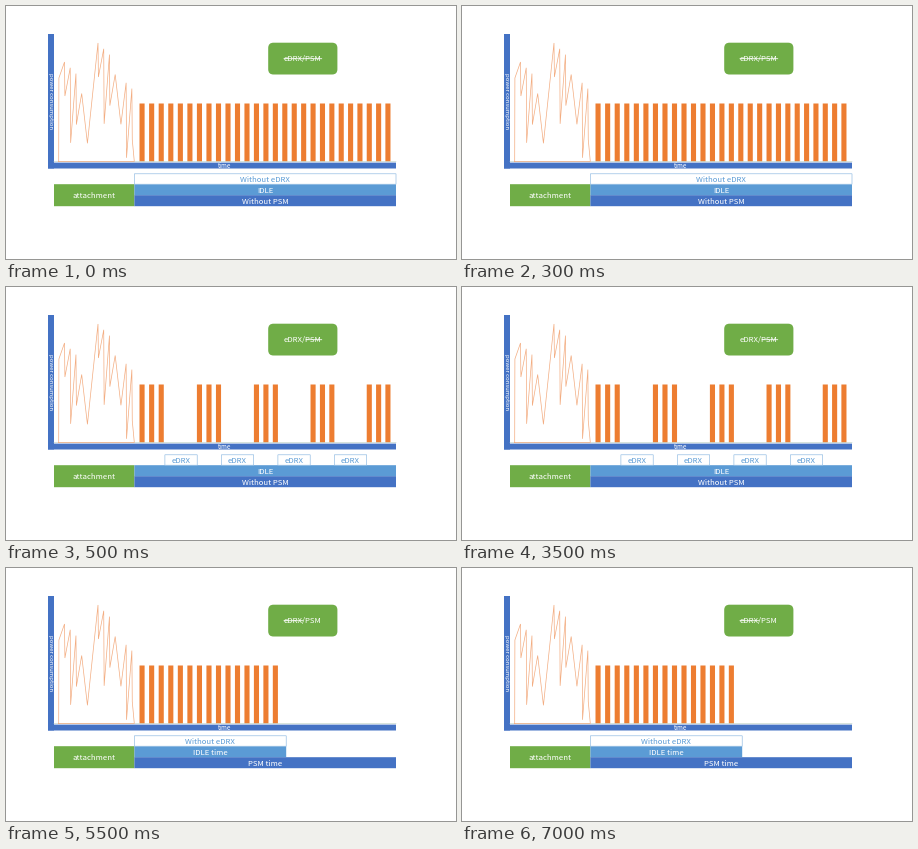
These frames come from a looping animation (450x253 px, 8 s). A matplotlib script:

```python
import matplotlib.pyplot as plt
from matplotlib.animation import FuncAnimation
from matplotlib.patches import FancyBboxPatch, Rectangle

W, H, DPI = 450, 253, 64
STEP = 500
FRAMES = 16

BLUE, SKY, GREEN, ORANGE = "#4472c4", "#5b9bd5", "#70ad47", "#ed7d31"
GROUND = 155.5
LEFT, SPLIT, RIGHT = 48, 128.4, 390
PITCH = 5.73
FALLS = (34, 75, 51)

plt.rcParams["font.family"] = "Noto Sans CJK JP"
fig = plt.figure(figsize=(W / DPI, H / DPI), dpi=DPI, facecolor="white")
ax = fig.add_axes([0, 0, 1, 1])


def pt(px):
    return px * 72 / DPI


def box(x0, y0, x1, y1, fill, edge="none", lw=0.7):
    ax.add_patch(Rectangle((x0, y0), x1 - x0, y1 - y0, facecolor=fill,
                           edgecolor=edge, linewidth=pt(lw), snap=False))


def line(xs, ys, color, lw):
    ax.plot(xs, ys, color=color, lw=pt(lw), solid_joinstyle="miter", snap=False)


def label(x, y, text, color="white", size=7.8, **kw):
    kw = {"ha": "center", "va": "baseline", **kw}
    ax.text(x, y, text, color=color, fontsize=pt(size), **kw)


def teeth(x, top, first=0):
    """Sawtooth whose peaks sink step by step."""
    pts = []
    for k in range(first, 3):
        px, py = x + PITCH * k, top + 5.8 * k
        pts += [(px, py), (px + 0.4, py + FALLS[k])]
    return pts


def burst(x, top):
    """Three teeth, then one slow peak and its trough."""
    return teeth(x, top) + [(x + 3 * PITCH, top + 31.5),
                            (x + 4 * PITCH, top + 81.3)]


def attach_curve():
    path = [(52.7, GROUND), (52.9, 72)]
    path += burst(58.5, 56) + burst(92, 37) + teeth(114.4, 71, first=1)
    path += [(128.3, GROUND), path[0]]
    line(*zip(*path), "#f3ac80", 0.7)


def chart(shown):
    line([LEFT, RIGHT], [GROUND, GROUND], "#bdd2c6", 0.6)
    attach_curve()
    for i in range(27):
        if shown(i):
            x = 133.5 + 9.6 * i - 0.0055 * i * i
            box(x, 97.5, x + 5.1, GROUND, ORANGE)
    box(42, 28, LEFT, 162.5, BLUE)
    box(42, 156.6, RIGHT, 162.5, BLUE)
    label(44.5, 95, "power consumption", size=6, rotation=-90, va="center")
    label(219, 161.7, "time", size=6.2)


def badge(struck):
    ax.add_patch(FancyBboxPatch((262.2, 36.7), 69.2, 31.8, facecolor=GREEN,
                                edgecolor="none",
                                boxstyle="round,pad=0,rounding_size=5.3"))
    label(296.9, 55.3, "eDRX/PSM")
    line(struck, [52.7, 52.7], "white", 0.8)


def phases(idle_end, idle, psm):
    box(LEFT, 178.2, SPLIT, 200.2, GREEN)
    box(SPLIT, 178.2, idle_end, 189.2, SKY)
    box(SPLIT, 189.2, RIGHT, 200.2, BLUE)
    label((LEFT + SPLIT) / 2, 192, "attachment")
    label((SPLIT + idle_end) / 2, 186.6, idle)
    label((SPLIT + RIGHT) / 2, 197.5, psm)


def window(x0, x1, text):
    box(x0, 167.8, x1, 178.2, "white", "#86b5e0", 0.6)
    label((x0 + x1) / 2, 175.8, text, SKY)


def always_on():
    chart(lambda i: True)
    badge([278, 315.7])
    phases(RIGHT, "IDLE", "Without PSM")
    window(SPLIT, RIGHT, "Without eDRX")


def edrx_only():
    chart(lambda i: i % 6 < 3)
    badge([300, 315.7])
    phases(RIGHT, "IDLE", "Without PSM")
    for k in range(4):
        x = 158.9 + 56.5 * k
        window(x, x + 32.3, "eDRX")


def psm_only():
    chart(lambda i: i < 15)
    badge([278, 297])
    phases(280.2, "IDLE time", "PSM time")
    window(SPLIT, 280.2, "Without eDRX")


def draw(n):
    ax.clear()
    ax.set(xlim=(0, W), ylim=(H, 0))
    ax.axis("off")
    t = n * STEP
    if t < 500:
        always_on()
    elif t < 5500:
        edrx_only()
    else:
        psm_only()
    return []


anim = FuncAnimation(fig, draw, frames=FRAMES, interval=STEP,
                     init_func=lambda: draw(0), repeat=True)
plt.show()
```
